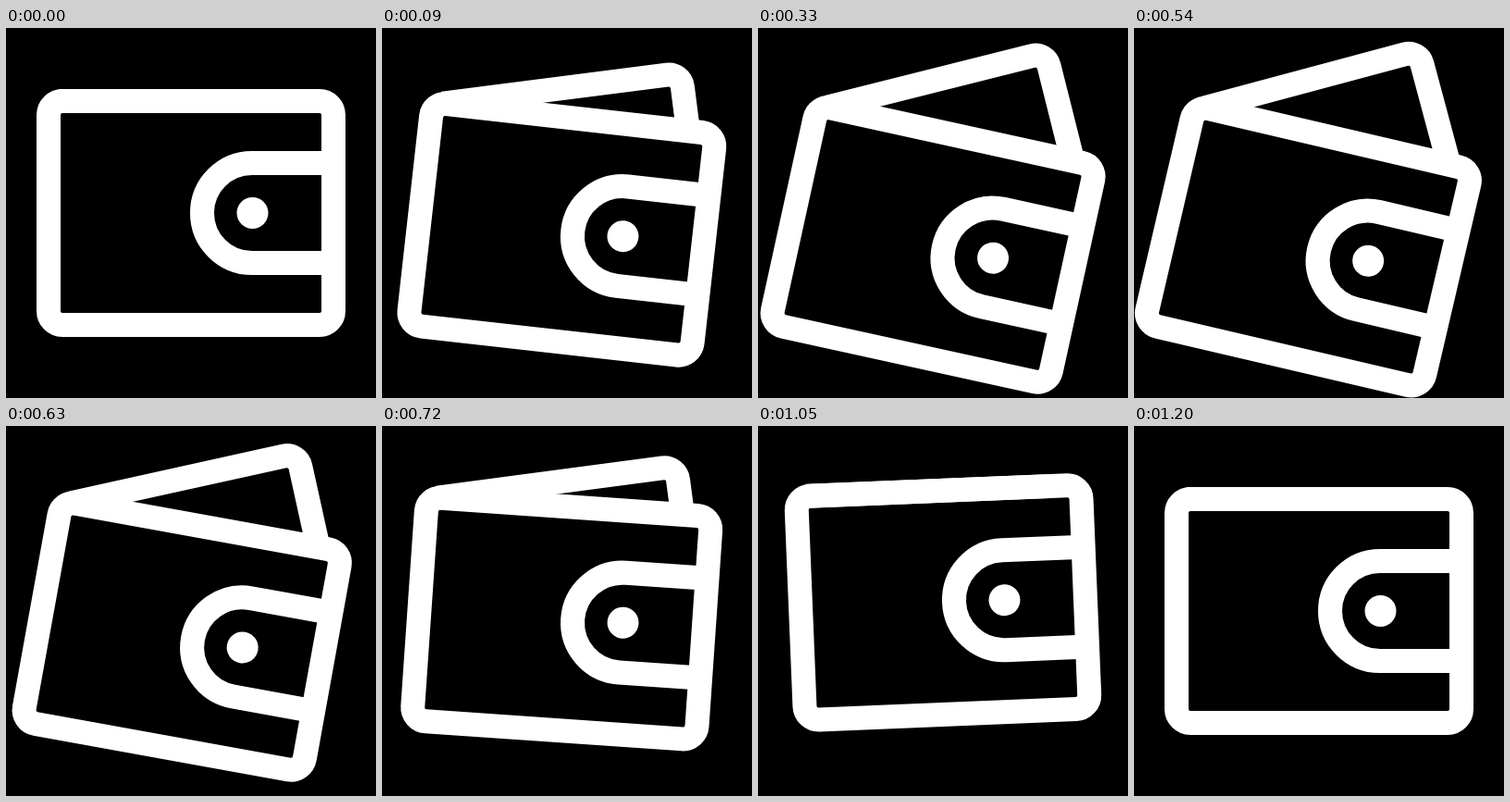
An HTML page that plays this animation: 400x400 px, repeating every 1.23 s.

```html
<!DOCTYPE html>
<html lang="en">
<head>
<meta charset="utf-8">
<title>Wallet</title>
<style>
  html, body { margin: 0; width: 100%; height: 100%; overflow: hidden; background: #000; }
  svg { display: block; width: 100vw; height: 100vh; }
</style>
</head>
<body>
<svg viewBox="0 0 400 400">
  <g id="wallet" fill="none" stroke="#fff" stroke-width="26">
    <rect x="46" y="79" width="308" height="242" rx="15"/>
    <path d="M354 146H266a54 54 0 0 0 0 108H354"/>
    <circle cx="266.5" cy="200" r="17" fill="#fff" stroke="none"/>
    <path id="flap"/>
  </g>
</svg>
<script>
const LOOP = 1230, STEP = 30;
const wallet = document.getElementById('wallet');
const flap = document.getElementById('flap');

const bezier = (x1, y1, x2, y2) => x => {
  const at = (a, b, s) => 3 * (1 - s) ** 2 * s * a + 3 * (1 - s) * s * s * b + s ** 3;
  let lo = 0, hi = 1;
  for (let i = 0; i < 24; i++) {
    const mid = (lo + hi) / 2;
    if (at(x1, x2, mid) < x) lo = mid; else hi = mid;
  }
  return at(y1, y2, lo);
};
const swing = bezier(.167, .1, 0, 1);
const smooth = bezier(.33, 0, .67, 1);
const settle = bezier(.33, 0, .58, 1);

// Poses: [angle, x, y]
const rest = [0, 0, 0], open = [13.15, -11.6, 36.6], raised = [-5.25, 0, -20.4];
const phases = [
  [0, 540, rest, open, swing],
  [540, 900, open, raised, smooth],
  [900, 1200, raised, rest, settle]
];

const progress = (t, start, end) => Math.min(1, Math.max(0, (t - start) / (end - start)));

function drawFlap(amount) {
  const angle = 28.15 * amount;
  const length = 262 - 23 * amount ** 3;
  const depth = length * Math.tan(angle * Math.PI / 180);
  const r = Math.min(15, depth);
  flap.setAttribute('d', `M0 0H${length - r}a${r} ${r} 0 0 1 ${r} ${r}V${depth}`);
  flap.setAttribute('transform', `translate(57 79) rotate(${-angle})`);
}

function draw(t) {
  const [start, end, from, to, ease] = phases.find(p => t < p[1]) || phases[2];
  const k = ease(progress(t, start, end));
  const [angle, x, y] = from.map((v, i) => v + (to[i] - v) * k);
  wallet.setAttribute('transform', `translate(${x} ${y}) rotate(${angle} 200 200)`);
  drawFlap(t < 540 ? swing(t / 540) : 1 - smooth(progress(t, 540, 860)));
}

const begin = performance.now();
function tick() {
  const t = (performance.now() - begin) % LOOP;
  draw(Math.floor(t / STEP) * STEP);
  requestAnimationFrame(tick);
}
tick();
</script>
</body>
</html>
```
